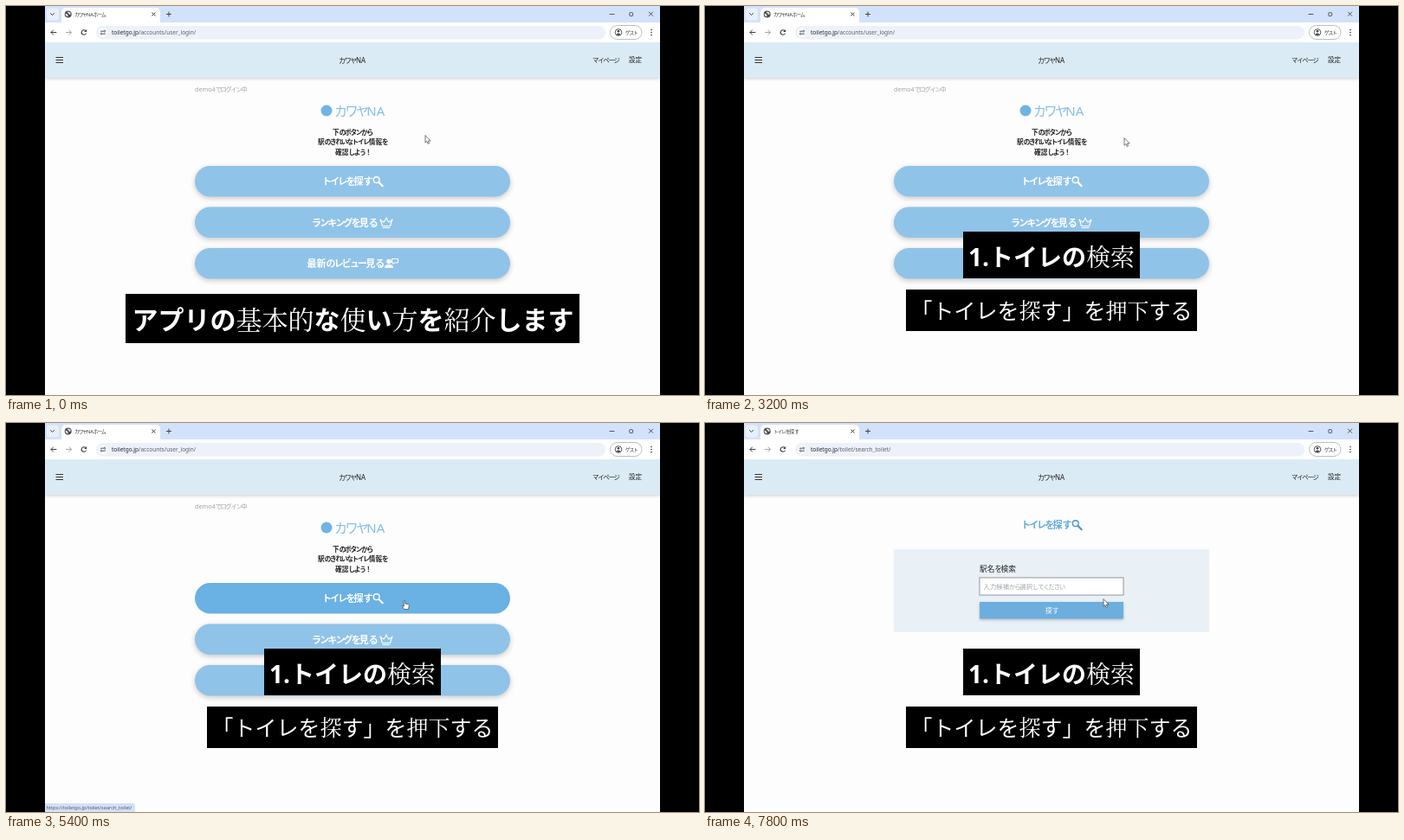
These frames come from a looping animation (800x450 px, 8000 ms). An HTML page with a canvas:

```html
<!DOCTYPE html>
<html lang="ja">
<head>
<meta charset="utf-8">
<title>アプリの使い方</title>
<style>
html, body { margin: 0; width: 100%; height: 100%; overflow: hidden; background: #000; }
canvas { display: block; }
</style>
</head>
<body>
<canvas id="stage" width="800" height="450"></canvas>
<script>
const ctx = document.getElementById('stage').getContext('2d');
const LOOP = 8000, STEP = 200;
const SANS = '"Noto Sans", "Noto Sans CJK JP", sans-serif';
const SERIF = '"Noto Serif CJK JP", "Noto Serif", serif';
const APP = 'カワヤNA';
const INK = '#3c3f43', BLUE = '#90c3e8', DEEP = '#6ab1e4';

// Pointer keyframes: start time, tip x, tip y, shape
const POINTER = [
  [0, 484, 150, 'arrow'], [2800, 484, 153, 'arrow'], [3600, 484, 164, 'arrow'],
  [3800, 484, 178, 'arrow'], [4000, 481, 196, 'hand'], [4200, 475, 199, 'hand'],
  [4400, 463, 203, 'hand'], [4600, 460, 205, 'hand'], [6600, 460, 204, 'arrow']
];

function rect(x, y, w, h, fill) {
  ctx.fillStyle = fill;
  ctx.fillRect(x, y, w, h);
}

function round(x, y, w, h, r, fill, stroke) {
  ctx.beginPath();
  ctx.roundRect(x, y, w, h, r);
  if (fill) { ctx.fillStyle = fill; ctx.fill(); }
  if (stroke) { ctx.strokeStyle = stroke; ctx.lineWidth = 0.8; ctx.stroke(); }
}

function disc(x, y, r, fill) {
  ctx.beginPath();
  ctx.arc(x, y, r, 0, Math.PI * 2);
  ctx.fillStyle = fill;
  ctx.fill();
}

function ring(x, y, r, color, width = 1, from = 0, to = Math.PI * 2) {
  ctx.beginPath();
  ctx.arc(x, y, r, from, to);
  ctx.strokeStyle = color;
  ctx.lineWidth = width;
  ctx.stroke();
}

function path(d, x, y, { fill, stroke, width = 1 } = {}) {
  const p = new Path2D(d);
  ctx.save();
  ctx.translate(x, y);
  ctx.lineJoin = ctx.lineCap = 'round';
  if (fill) { ctx.fillStyle = fill; ctx.fill(p); }
  if (stroke) { ctx.strokeStyle = stroke; ctx.lineWidth = width; ctx.stroke(p); }
  ctx.restore();
}

function line(d, x, y, color = INK, width = 1) {
  path(d, x, y, { stroke: color, width });
}

function withShadow(dy, blur, alpha, draw) {
  ctx.save();
  ctx.shadowColor = `rgba(0,0,0,${alpha})`;
  ctx.shadowOffsetY = dy;
  ctx.shadowBlur = blur;
  draw();
  ctx.restore();
}

// Interface text with tightly set kana
function label(text, x, y, size, color = '#222', weight = 400) {
  ctx.font = `${weight} ${size}px ${SANS}`;
  ctx.fillStyle = color;
  for (const run of text.match(/[ぁ-ヿ]+|[^ぁ-ヿ]+/g)) {
    ctx.letterSpacing = /[ぁ-ヿ]/.test(run) ? `${-0.17 * size}px` : '0px';
    ctx.fillText(run, x, y);
    x += ctx.measureText(run).width;
  }
  ctx.letterSpacing = '0px';
  return x;
}

// Caption: gothic kana, serif kanji
function caption(text, box, x, y, size, kanaWeight, kanjiWeight) {
  rect(...box, '#000');
  ctx.fillStyle = '#fff';
  for (const run of text.match(/[一-鿿]+|[^一-鿿]+/g)) {
    ctx.font = /[一-鿿]/.test(run)
      ? `${kanjiWeight} ${size}px ${SERIF}` : `${kanaWeight} ${size}px ${SANS}`;
    ctx.fillText(run, x, y);
    x += ctx.measureText(run).width;
  }
}

function magnifier(x, y, color) {
  ring(x + 4.2, y + 4.2, 3.4, color, 1.4);
  line('M7 7 L11.2 11.2', x, y, color, 2.2);
}

function crown(x, y) {
  line('M3 10 L1 3.5 L4.6 5.5 L7.5 1.5 L10.4 5.5 L14 3.5 L12 10 Z M3.5 12 H11.5', x, y, '#fff', 1.1);
  for (const [dx, dy] of [[0.8, 3], [7.5, 1], [14.2, 3]]) disc(x + dx, y + dy, 0.9, '#fff');
}

function reviewer(x, y) {
  disc(x + 5, y + 4, 2.8, '#fff');
  path('M0 11.5 Q0 7.5 5 7.5 Q10 7.5 10 11.5 Z', x, y, { fill: '#fff' });
  line('M9 1 H15.5 V5.5 H11.5 L10 7 V5.5 H9 Z', x, y, '#fff', 1);
}

function globe(x, y, loading, t) {
  if (loading) {
    disc(x, y, 2.7, '#7d868e');
    const a = t / 200;
    ring(x, y, 3.7, '#456a90', 1.1, a, a + 4);
    return;
  }
  disc(x, y, 4, '#484d52');
  path('M-3 -1 L-1 0 L0 2 L-1 3 L-3 1 Z M0 -3 L2.6 -2 L3 0 L1 0.5 L1 -1 L-1 -1.4 Z', x, y, { fill: '#e9eef4' });
}

function browser(t) {
  const loading = t >= 6400 && t < 6800;
  const arrived = t >= 6600;
  rect(45, 0, 710, 20, '#d3e2fb');
  round(47, 2.5, 14, 14, 4, '#e9f0fd');
  line('M-2 -1 L0 1 L2 -1', 53.5, 9.5);
  round(64, 2, 114, 20, [5, 5, 0, 0], '#fff');
  rect(45, 19, 710, 23, '#fff');
  globe(71.7, 9.5, loading, t);
  label(arrived ? 'トイレを探す' : APP + 'ホーム', 79, 11.7, 5.6, '#333');
  line('M-1.7 -1.7 L1.7 1.7 M1.7 -1.7 L-1.7 1.7', 170.5, 9.5, '#333');
  line('M-2.5 0 H2.5 M0 -2.5 V2.5', 188, 9.5, '#444');
  line('M-2.5 0 H2.5', 699.5, 9.5, '#333', 0.8);
  round(719.8, 7.7, 3.8, 3.8, 0.8, null, '#333');
  line('M-2.2 -2.2 L2.2 2.2 M2.2 -2.2 L-2.2 2.2', 744.5, 9.2, '#333', 0.8);

  line('M3 0 H-3 M-0.5 -2.6 L-3 0 L-0.5 2.6', 55, 30.5);
  line('M-3 0 H3 M0.5 -2.6 L3 0 L0.5 2.6', 72.5, 30.5, '#a4a7ab');
  if (loading) {
    line('M-2.3 -2.3 L2.3 2.3 M2.3 -2.3 L-2.3 2.3', 90, 30.5);
  } else {
    ring(90, 30.5, 2.8, INK, 1.1, 0.4, 5.5);
    path('M3.2 -3.4 V-0.4 H0.2 Z', 90, 30.5, { fill: INK });
  }
  round(104, 23, 588, 15.5, 8, '#edf1fa');
  disc(112, 30.7, 5.2, '#fff');
  line('M-2.6 -1.5 H0 M2.6 1.5 H0', 112, 30.7, INK, 0.9);
  ring(113.7, 29.2, 1, INK, 0.8);
  ring(110.3, 32.2, 1, INK, 0.8);
  const x = label('toiletgo.jp', 122, 33, 6.5, '#25282c');
  label(arrived ? '/toilet/search_toilet/' : '/accounts/user_login/', x, 33, 6.5, '#5c6168');
  round(697.5, 22.5, 36.5, 16, 8, '#fff', '#a9acb1');
  ring(707, 30.5, 3.8, INK, 0.9);
  disc(707, 29.3, 1.3, INK);
  path('M-2.4 2.4 Q0 -0.3 2.4 2.4 Q0 4.2 -2.4 2.4', 707, 30.5, { fill: INK });
  label('ゲスト', 715, 32.8, 5.6, '#333');
  for (const y of [27.5, 30.5, 33.5]) disc(745, y, 0.85, INK);
}

function siteHeader() {
  withShadow(1, 4, 0.2, () => rect(45, 42, 710, 41, '#dbebf5'));
  for (const y of [59, 62, 65]) rect(57.5, y, 8.5, 1, '#333');
  label(APP, 384, 65.6, 8, '#222');
  label('マイページ', 677, 65.4, 7.4, '#222');
  label('設定', 719, 65.4, 7.5, '#222');
}

function pill(y, text, textX, hover) {
  const draw = () => round(218, y, 364, 35.5, 17.75, hover ? DEEP : BLUE);
  hover ? draw() : withShadow(2, 6, 0.22, draw);
  label(text, textX, y + 22, 11, '#fff', 700);
}

function homePage(hover) {
  label('demo4でログイン中', 218, 98.8, 7.2, '#a3a3a3');
  disc(370, 121, 6.5, '#6fb4e4');
  label(APP, 379, 126.5, 15, '#82bde8', 500);
  label('下のボタンから', 377, 148.6, 7.7, '#222', 700);
  label('駅のきれいなトイレ情報を', 360, 160.4, 7.7, '#222', 700);
  label('確認しよう！', 380, 172.3, 7.7, '#222', 700);
  pill(185, 'トイレを探す', 365, hover);
  magnifier(423.5, 197, '#fff');
  pill(232.5, 'ランキングを見る', 353, false);
  crown(431.5, 244.5);
  pill(280, '最新のレビュー見る', 347.5, false);
  reviewer(437, 291.5);
}

function searchPage() {
  label('トイレを探す', 365, 122, 11, '#64aadb', 700);
  magnifier(423.5, 112, '#4a94cb');
  rect(218, 146, 364, 96, '#e9f1f7');
  label('駅名を検索', 317, 171.7, 8.7, '#222');
  rect(316.5, 178.5, 167, 21, '#868b90');
  rect(317.4, 179.4, 165.2, 19.2, '#fff');
  label('入力候補から選択してください', 321.5, 191.8, 7.4, '#a2a5a8');
  withShadow(1, 3, 0.22, () => rect(317, 207, 166, 19.5, '#6cafdf'));
  label('探す', 393, 219.7, 7.7, '#fff');
}

function statusBar(t) {
  if (t < 4600 || t >= 6800) return;
  ctx.globalAlpha = Math.min(1, 0.4 + (t - 4600) / 400 * 0.6);
  round(45, 440, 104, 10, [0, 3, 0, 0], '#d3e1f8');
  label('https://toiletgo.jp/toilet/search_toilet/', 46.5, 447.4, 5.6, '#4d5868');
  ctx.globalAlpha = 1;
}

function pointer(t) {
  const [, x, y, shape] = POINTER.findLast(k => k[0] <= t);
  const d = shape === 'arrow'
    ? 'M0 0 V8.2 L1.9 6.5 L3.2 9.5 L4.6 8.9 L3.3 6 H5.8 Z'
    : 'M-0.8 0.8 Q0 -0.5 0.8 0.8 V4 L4.4 4.7 Q5.5 5 5.3 6.5 L4.5 10.5 H-0.2 L-3 6.8 Q-2.7 5.5 -0.8 7 Z';
  path(d, x, y, { fill: '#fff', stroke: '#4a4a4a', width: 0.75 });
}

function captions(t) {
  if (t < 3200) {
    caption('アプリの基本的な使い方を紹介します', [138, 333, 524, 57], 145.5, 374, 30, 700, 500);
  } else {
    caption('1.トイレの検索', [298, 261, 204, 54], 304, 301, 28, 700, 500);
    caption('「トイレを探す」を押下する', [232, 328, 336, 48], 237.5, 362.3, 25, 400, 300);
  }
}

function render(t) {
  rect(0, 0, 800, 450, '#000');
  ctx.save();
  ctx.beginPath();
  ctx.rect(45, 0, 710, 450);
  ctx.clip();
  rect(45, 0, 710, 450, '#fdfdfd');
  siteHeader();
  browser(t);
  t < 6800 ? homePage(t >= 4000) : searchPage();
  statusBar(t);
  pointer(t);
  ctx.restore();
  captions(t);
}

const start = performance.now();
function tick() {
  const t = (performance.now() - start) % LOOP;
  render(Math.floor(t / STEP) * STEP);
  requestAnimationFrame(tick);
}
tick();
</script>
</body>
</html>
```
